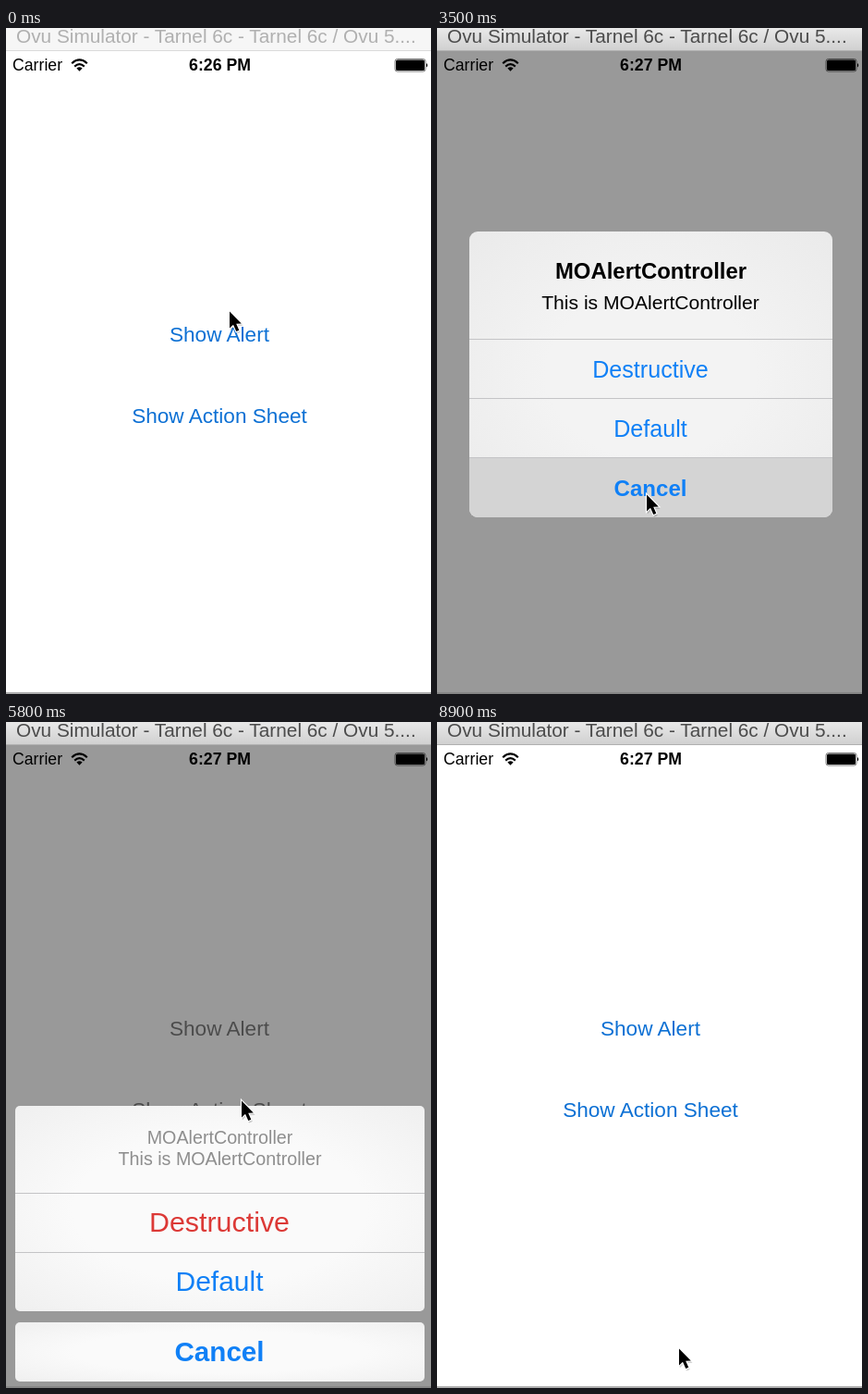
An HTML page that plays this animation: 460x720 px, repeating every 9000 ms.

```html
<!DOCTYPE html>
<html lang="en">
<head>
<meta charset="utf-8">
<title>Alert and action sheet</title>
<style>
  html, body { margin: 0; width: 100%; height: 100%; overflow: hidden; background: #fff; }
  svg { display: block; width: 460px; height: 720px; }
  text { font-family: "Liberation Sans", Arial, sans-serif; }
  .mid { text-anchor: middle; }
  .bold { font-weight: bold; }
  .link { font-size: 22.6px; }
  .blue { fill: #1080f6; }
  .red { fill: #dc3936; }
  .grey { fill: #8e8e8e; font-size: 19.7px; }
  .rule { stroke: #c4c4c6; stroke-width: 1; }
</style>
</head>
<body>
<svg viewBox="0 0 460 720">
  <defs>
    <linearGradient id="barFill" x2="0" y2="1">
      <stop stop-color="#e9e9e9"/><stop offset="1" stop-color="#d0d0d0"/>
    </linearGradient>
    <radialGradient id="alertFill" r=".72">
      <stop offset=".4" stop-color="#f3f3f3"/><stop offset="1" stop-color="#eaeaea"/>
    </radialGradient>
    <radialGradient id="sheetFill" r=".72">
      <stop offset=".5" stop-color="#fafafa"/><stop offset="1" stop-color="#efefef"/>
    </radialGradient>
    <path id="arrow" d="M1 1.5V19.5L5 15.8L8.3 23L11.3 21.7L8.2 14.7L13.8 14.4Z"/>
  </defs>
  <rect width="460" height="720" fill="#fff"/>

  <g id="status">
    <text x="7" y="46" font-size="17.7">Carrier</text>
    <g fill="none" stroke="#000" stroke-width="2.2">
      <path d="M71.2 38.2Q79.5 30.6 87.8 38.2M74.2 41.6Q79.5 36.8 84.8 41.6"/>
      <path d="M76.4 43.6Q79.5 41 82.6 43.6L79.5 46.8Z" fill="#000" stroke="none"/>
    </g>
    <text id="clock" class="mid bold" x="231.5" y="46" font-size="17.7"></text>
    <rect x="421" y="33.5" width="33" height="13.5" rx="2.5" fill="none" stroke="#777"/>
    <rect x="422" y="34.5" width="31" height="11.5" rx="1.5"/>
    <path d="M455 38q2.5 2.2 0 4.6z"/>
  </g>

  <text id="alertLink" class="mid link" x="231" y="339">Show Alert</text>
  <text id="sheetLink" class="mid link" x="231" y="427">Show Action Sheet</text>
  <rect id="dim" y="24" width="460" height="696"/>

  <g id="alert">
    <rect x="35" y="220" width="393" height="309" rx="9" fill="url(#alertFill)"/>
    <path id="alertPress" d="M35 465H428V520a9 9 0 0 1-9 9H44a9 9 0 0 1-9-9Z" fill="#d4d4d4"/>
    <path class="rule" d="M35 336.5H428M35 400.5H428M35 464.5H428"/>
    <text class="mid bold" x="231.5" y="270.5" font-size="23.9">MOAlertController</text>
    <text class="mid" x="231" y="304" font-size="21.1">This is MOAlertController</text>
    <g class="mid blue" font-size="25.1">
      <text x="231" y="377.5">Destructive</text>
      <text x="231" y="441.5">Default</text>
      <text class="bold" x="231" y="505.5" font-size="24.1">Cancel</text>
    </g>
  </g>

  <g id="sheet">
    <rect x="10" y="415" width="443" height="222" rx="5" fill="url(#sheetFill)"/>
    <rect id="sheetCancel" x="10" y="649" width="443" height="64" rx="5" fill="url(#sheetFill)"/>
    <path class="rule" d="M10 509.5H453M10 573.5H453"/>
    <g class="mid">
      <text class="grey" x="231.5" y="456">MOAlertController</text>
      <text class="grey" x="231.5" y="479">This is MOAlertController</text>
      <text class="red" x="231" y="551" font-size="30.4">Destructive</text>
      <text class="blue" x="231" y="615" font-size="30">Default</text>
      <text class="blue bold" x="231" y="691" font-size="29.6">Cancel</text>
    </g>
  </g>

  <rect id="bar" width="460" height="24"/>
  <rect id="barEdge" y="24" width="460" height="1"/>
  <text id="barTitle" x="11" y="16" font-size="20.8">Ovu Simulator - Tarnel 6c - Tarnel 6c / Ovu 5....</text>
  <rect y="718.4" width="460" height="1.2" fill="#7d7d7d"/>

  <g id="cursor">
    <use href="#arrow" x="1" y="2" opacity=".18" stroke="#000"/>
    <use href="#arrow" stroke="#fff" stroke-width="2.2" paint-order="stroke"/>
  </g>
</svg>
<script>
const LOOP = 9000;
const PRESS = { alert: 1200, alertCancel: 3500, sheet: 5200, sheetCancel: 7700 };
const el = id => document.getElementById(id);
const set = (id, attrs) => {
  for (const name in attrs) el(id).setAttribute(name, attrs[name]);
};

const ramp = (t, start, length) => Math.min(1, Math.max(0, (t - start) / length));
const smooth = u => u * u * (3 - 2 * u);
const easeOut = u => 1 - (1 - u) ** 2.5;
const mix = (a, b, u) => a + (b - a) * u;

// Time, x, y of the pointer
const pointer = [
  [100, 241, 305], [900, 236, 334], [2200, 236, 334], [3100, 226, 503],
  [4150, 226, 503], [5000, 254, 408], [6200, 254, 408], [7100, 261, 676], [LOOP, 261, 676]
];

function pointerAt(t) {
  const next = Math.max(1, pointer.findIndex(key => key[0] > t));
  const [t0, x0, y0] = pointer[next - 1];
  const [t1, x1, y1] = pointer[next];
  const u = smooth(ramp(t, t0, t1 - t0));
  return [mix(x0, x1, u), mix(y0, y1, u)];
}

function linkColor(grey) {
  const channels = [12, 112, 212].map(c => Math.round(mix(c, 125, grey)));
  return `rgb(${channels})`;
}

// A pressed link turns faint, then recovers as its panel comes in
function linkOpacity(t, press, shown) {
  return t < press ? 1 : 0.2 + 0.8 * shown ** 3.5;
}

function draw(t) {
  const active = t >= PRESS.alert;
  set('bar', { fill: active ? 'url(#barFill)' : '#f6f6f6' });
  set('barEdge', { fill: active ? '#b0b0b0' : '#dadada' });
  set('barTitle', { fill: active ? '#4c4c4c' : '#b0b0b0' });
  el('clock').textContent = t < 600 ? '6:26 PM' : '6:27 PM';

  const alertIn = smooth(ramp(t, 1320, 500));
  const alertOut = smooth(ramp(t, 3650, 430));
  const sheetIn = easeOut(ramp(t, PRESS.sheet, 500));
  const sheetOut = smooth(ramp(t, 7820, 450));
  const alertShown = alertIn - alertOut;
  const sheetShown = sheetIn - sheetOut;
  set('dim', { opacity: 0.4 * Math.max(alertShown, sheetShown) });

  const grey = ramp(t, 1300, 200) - ramp(t, 3700, 350)
             + ramp(t, 5230, 340) - ramp(t, 7820, 400);
  set('alertLink', { fill: linkColor(grey), opacity: linkOpacity(t, PRESS.alert, alertIn) });
  set('sheetLink', { fill: linkColor(grey), opacity: linkOpacity(t, PRESS.sheet, sheetIn) });

  const scale = mix(1.26, 1, alertIn) - 0.16 * alertOut;
  set('alert', {
    opacity: alertShown,
    transform: `translate(231.5 374.5) scale(${scale}) translate(-231.5 -374.5)`
  });
  set('alertPress', { opacity: t >= PRESS.alertCancel ? 1 : 0 });

  set('sheet', { transform: `translate(0 ${305 * (1 - sheetShown)})` });
  set('sheetCancel', { fill: t >= PRESS.sheetCancel ? '#dedede' : 'url(#sheetFill)' });
  set('cursor', { transform: `translate(${pointerAt(t)})` });
}

function tick() {
  draw(performance.now() % LOOP);
  requestAnimationFrame(tick);
}
tick();
</script>
</body>
</html>
```
